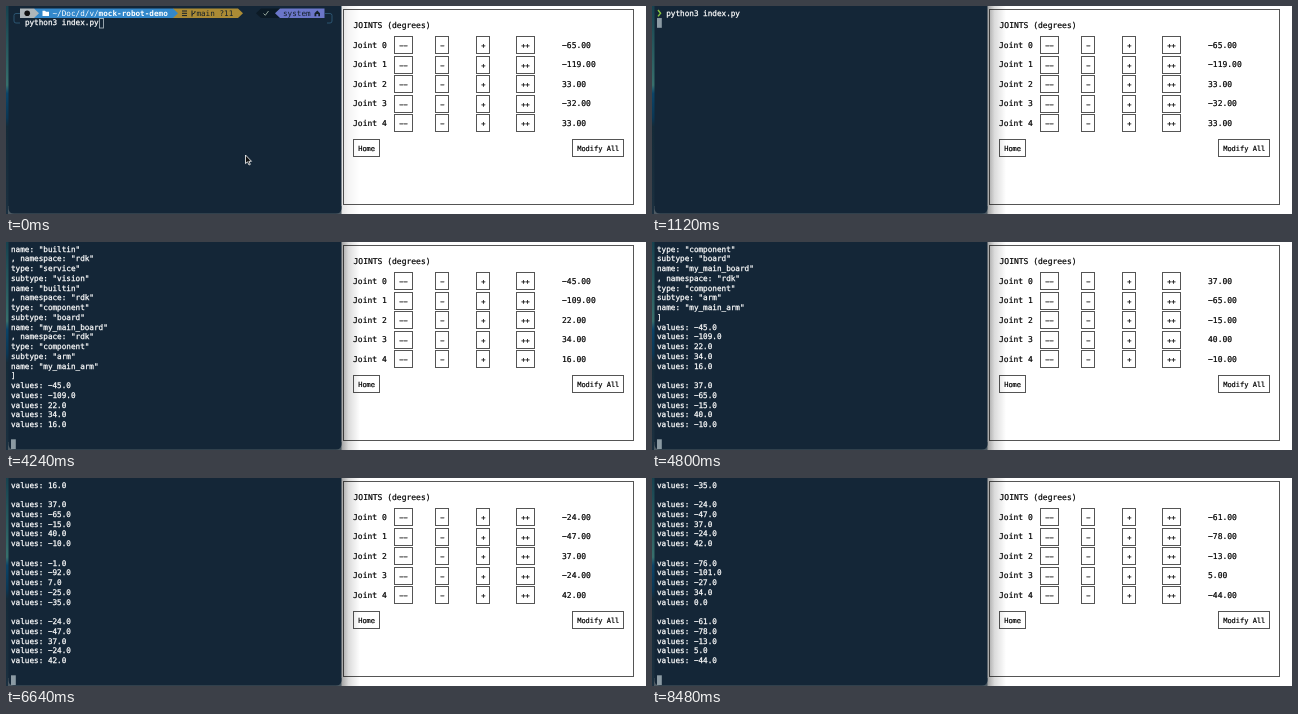
An HTML page for the animation above (8.8 s loop, 640 px wide and 208 px high).

```html
<!DOCTYPE html>
<html lang="en">
<head>
<meta charset="utf-8">
<title>Robot arm joints demo</title>
<style>
  html, body { margin: 0; width: 100%; height: 100%; overflow: hidden; background: #fff; }
  svg { display: block; }
  text { font-family: "DejaVu Sans Mono", monospace; white-space: pre; text-rendering: geometricPrecision; }
  #terminal text { font-size: 7.67px; fill: #fff; }
  #rows text { stroke: #fff; stroke-width: .25; }
  #rows tspan { fill: #35a0dc; stroke: #35a0dc; }
  #terminal .dark { fill: #14212b; }
  #page text { font-size: 8px; stroke: #000; stroke-width: .2; }
  #page .label { font-size: 7px; }
  #page rect { fill: none; stroke: #555; shape-rendering: crispEdges; }
</style>
</head>
<body>
<svg width="640" height="208" viewBox="0 0 640 208">
  <defs>
    <linearGradient id="fade">
      <stop offset="0" stop-opacity=".38"/>
      <stop offset=".4" stop-opacity=".14"/>
      <stop offset="1" stop-opacity="0"/>
    </linearGradient>
    <linearGradient id="desk" x2="0" y2="1">
      <stop offset="0" stop-color="#17424f"/>
      <stop offset=".38" stop-color="#376f6c"/>
      <stop offset=".42" stop-color="#0b4468"/>
      <stop offset=".54" stop-color="#0a3653"/>
      <stop offset=".58" stop-color="#142a38"/>
      <stop offset="1" stop-color="#1b3040"/>
    </linearGradient>
  </defs>
  <g id="page"></g>
  <rect id="shadow" x="335" width="19" height="208" fill="url(#fade)"/>
  <rect width="8" height="208" fill="url(#desk)"/>
  <path d="M2 208H335.500V200H2Z" fill="#4d5a63"/>
  <g id="terminal">
    <path d="M2.500 0H335.500V202Q335.500 207.500 330 207.500H8Q2.500 207.500 2.500 202Z" fill="#142637"/>
    <g id="prompt">
      <path d="M14 7.500H10Q8 7.500 8 9.500V15Q8 17 10 17H14M319 7.500H324Q326 7.500 326 9.500V15Q326 17 324 17H321" fill="none" stroke="#31607f" stroke-width=".8"/>
      <path d="M167 2.500H232L237 7.300L232 12H167Z" fill="#ab8b35"/>
      <path d="M28 2.500H167L172 7.300L167 12H28Z" fill="#3388cb"/>
      <path d="M14 2.500H28L33 7.300L28 12H14Z" fill="#aeb6ba"/>
      <path d="M255 2.500H276V12H255L250 7.300Z" fill="#0c1a25"/>
      <path d="M274 2.500H318.500V12H274L269 7.300Z" fill="#6b76c9"/>
      <circle cx="21.200" cy="7.300" r="2.800" fill="#111"/>
      <path d="M36.500 4.800H39L40 5.800H43V10H36.500Z" fill="#fff"/>
      <path d="M176 5H181M176 7.300H181M176 9.600H181M186 4.500V10.500M189 5V6.500L186 8.500" fill="none" stroke="#14212b"/>
      <path d="M257.500 7.500L259.300 9.300L262.500 5" fill="none" stroke="#93a59a"/>
      <path d="M308.500 10.300V7.200L311.300 4.500L314 7.200V10.300H312.300V8H310.300V10.300Z" fill="#14212b"/>
      <text x="46.500" y="9.600">~/Doc/d/v/<tspan font-weight="bold">mock-robot-demo</tspan></text>
      <text x="190.400" y="9.600" class="dark">main ?11</text>
      <text x="277" y="9.600" class="dark">system</text>
      <text x="18.900" y="19.400" stroke="#fff" stroke-width=".25">python3 index.py</text>
      <rect x="93.500" y="12.500" width="4" height="9.500" fill="none" stroke="#a4b0b8" stroke-width=".9"/>
    </g>
    <path id="chevron" d="M6 4L8.600 7.200L6 10.400" fill="none" stroke="#86c440" stroke-width="1.400"/>
    <g id="rows"></g>
    <rect id="cursor" x="5" width="4.800" height="9.750" fill="#8b9aa3"/>
  </g>
  <path id="pointer" d="M239.500 149V157.600L241.500 155.800L243 159L244.300 158.400L242.900 155.300H245.500Z" fill="#111" stroke="#fff" stroke-width=".8"/>
</svg>
<script>
const LOOP = 8800, ROWS = 21, PITCH = 9.75;
const ENTER = 600, RUN = 1040, DIAL = 3680, LIST = 3760;
const INITIAL = [-65, -119, 33, -32, 33];

// [time printed in the terminal, time shown on the page, joint angles]
const moves = [
  [3840, 3840, [-45, -109, 22, 34, 16]],
  [4640, 4800, [37, -65, -15, 40, -10]],
  [5600, 5720, [-1, -92, 7, -25, -35]],
  [6520, 6640, [-24, -47, 37, -24, 42]],
  [7440, 7560, [-76, -101, -27, 34, 0]],
  [8360, 8480, [-61, -78, -13, 5, -44]]
];
const resources = [
  ["service", "motion", "builtin"],
  ["service", "sensors", "builtin"],
  ["service", "vision", "builtin"],
  ["component", "board", "my_main_board"],
  ["component", "arm", "my_main_arm"]
];

const $ = id => document.getElementById(id);
const page = $("page");

// The minus sign gives the long dash wanted in place of the short hyphen.
const dashes = text => text.replace(/-/g, "\u2212");

function add(parent, tag, attrs, content = "") {
  const el = document.createElementNS("http://www.w3.org/2000/svg", tag);
  for (const key in attrs) el.setAttribute(key, attrs[key]);
  el.textContent = dashes(content);
  return parent.appendChild(el);
}

function button(x, y, width, label) {
  add(page, "rect", { x: x + .5, y: y + .5, width, height: 17 });
  add(page, "text", { x: x + 5.2, y: y + 11.5, class: "label" }, label);
}

add(page, "rect", { x: 337.5, y: 3.5, width: 290, height: 195 });
add(page, "text", { x: 347.5, y: 22.4 }, "JOINTS (degrees)");
const angles = INITIAL.map((_, i) => {
  const y = 39 + 19.55 * i, top = Math.round(y - 9);
  add(page, "text", { x: 347, y: y + 2.5 }, "Joint " + i);
  button(388, top, 18, "--");
  button(429, top, 13, "-");
  button(470, top, 13, "+");
  button(510, top, 18, "++");
  return add(page, "text", { x: 556, y: y + 2.5 });
});
button(347, 133, 26, "Home");
button(566, 133, 51, "Modify All");

const rows = Array.from({ length: ROWS }, (_, i) =>
  add($("rows"), "text", { x: 5, y: 9.6 + PITCH * i }));

function logAt(t) {
  if (t < ENTER) return [];
  const log = ["  python3 index.py"];
  if (t >= DIAL) log.push(
    "2022-10-10 13:01:19,434         INFO    viam.rpc.dial (dial.py:188)   C",
    "onnecting to socket: b'/tmp/proxy-5JiAqGZC.sock'");
  if (t >= LIST) {
    log.push("Resources:");
    resources.forEach(([type, subtype, name], i) => log.push(
      (i ? ", " : "[") + 'namespace: "rdk"', `type: "${type}"`, `subtype: "${subtype}"`, `name: "${name}"`));
    log.push("]");
  }
  for (const [printed, , values] of moves)
    if (t >= printed) log.push(...values.map(v => "values: " + v.toFixed(1)), "");
  return log;
}

function show(id, on) {
  $(id).style.display = on ? "" : "none";
}

function draw(t) {
  const log = logAt(t), visible = log.slice(1 - ROWS);
  rows.forEach((row, i) => {
    row.innerHTML = dashes(visible[i] || "").replace("INFO", "<tspan>INFO</tspan>");
  });
  $("cursor").setAttribute("y", 2.3 + PITCH * visible.length);
  show("prompt", t < ENTER);
  show("chevron", t >= ENTER && log.length < ROWS);
  show("cursor", t >= RUN);
  show("pointer", t < RUN);

  const focus = Math.min(1, Math.max(0, (t - 440) / 320));
  $("shadow").setAttribute("opacity", .3 + .7 * focus);

  const current = moves.filter(move => t >= move[1]).pop();
  const values = current ? current[2] : INITIAL;
  angles.forEach((el, i) => { el.textContent = dashes(values[i].toFixed(2)); });
}

const start = performance.now();
function tick() {
  draw((performance.now() - start) % LOOP);
  requestAnimationFrame(tick);
}
tick();
</script>
</body>
</html>
```
